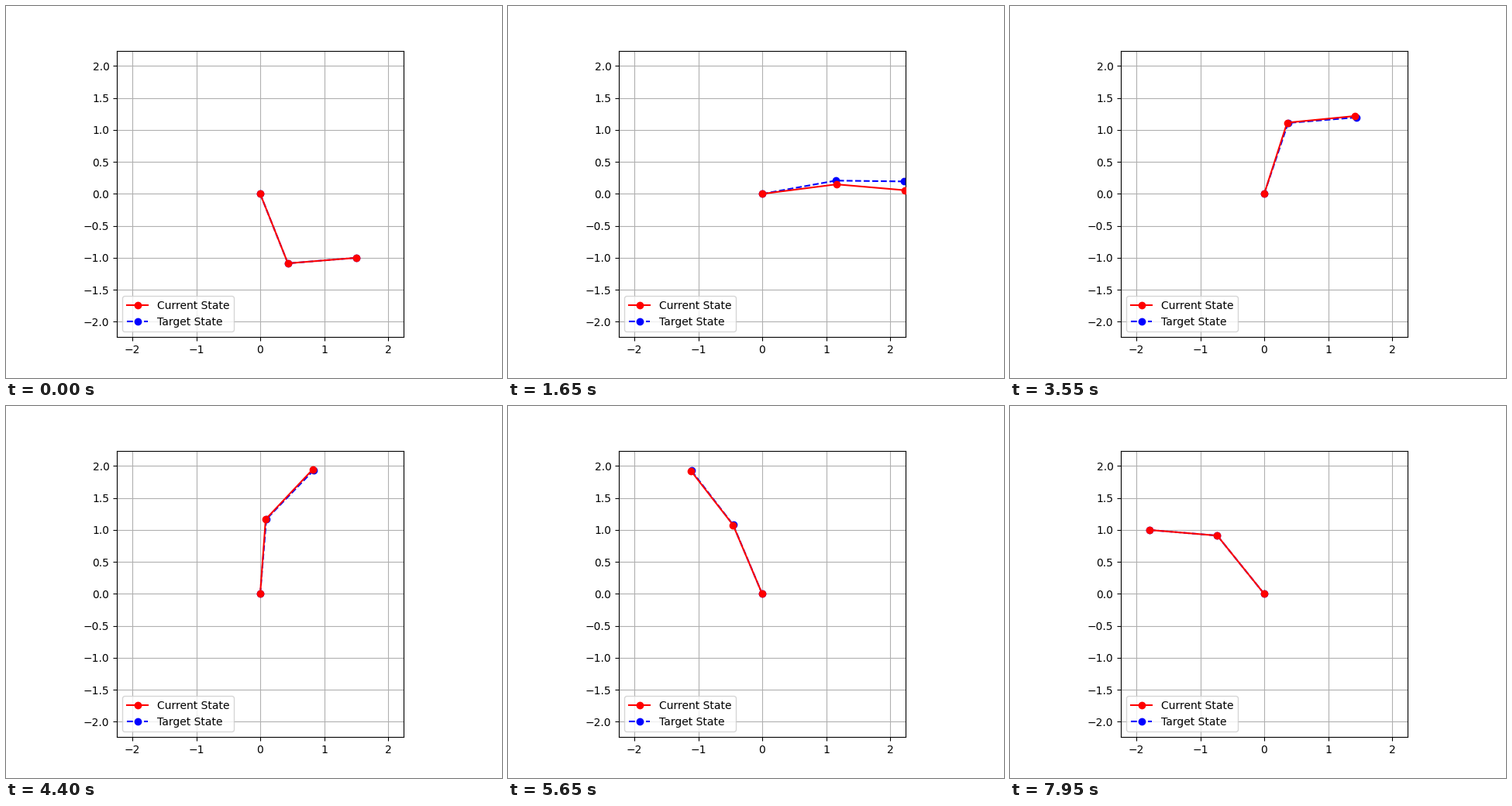
Animation, 640 px wide and 480 px high, one loop 8 s. Source, as a matplotlib script:

```python
import numpy as np
import matplotlib.pyplot as plt
from matplotlib.animation import FuncAnimation

L1, L2 = 1.17, 1.07
REACH = L1 + L2
STEP = 0.05
FRAMES = 160

# Tracking error in degrees: first joint, and absolute angle of the second link
ERR_T = np.array([0, 0.45, 0.9, 1.65, 2.35, 2.9, 3.4, 4.4, 5.65, 7, 8])
ERR_1 = np.array([0, 0.55, 1.75, 2.9, 2.3, 0.6, -0.6, -0.5, -0.15, 0, 0])
ERR_12 = np.array([0, 1.4, 3.5, 4.2, 3.0, 0.8, -0.75, -0.6, -0.3, 0, 0])


def inverse(x, y, bend):
    """Joint angles that put the tip at (x, y); bend picks the elbow side."""
    c = (x * x + y * y - L1**2 - L2**2) / (2 * L1 * L2)
    q2 = bend * np.arccos(c)
    q1 = np.arctan2(y, x) - np.arctan2(L2 * np.sin(q2), L1 + L2 * np.cos(q2))
    return np.array([q1, q2])


START = inverse(1.5, -1, 1)
MIDDLE = inverse(1.5, 1, -1)
FINISH = inverse(-1.8, 1, 1)


def ease(a, b, s):
    s = np.clip(s, 0, 1)
    return a + (b - a) * s * s * (3 - 2 * s)


def target(t):
    if t < 3:
        return ease(START, MIDDLE, t / 3)
    return ease(MIDDLE, FINISH, (t - 3) / 4)


def hermite(t, xs, ys):
    slopes = np.gradient(ys, xs)
    i = min(np.searchsorted(xs, t, side="right") - 1, len(xs) - 2)
    h = xs[i + 1] - xs[i]
    u = (t - xs[i]) / h
    return ((1 + 2 * u) * (1 - u)**2 * ys[i] + u * (1 - u)**2 * h * slopes[i]
            + u * u * (3 - 2 * u) * ys[i + 1] + u * u * (u - 1) * h * slopes[i + 1])


def joints(q1, q12):
    ex, ey = L1 * np.cos(q1), L1 * np.sin(q1)
    return [0, ex, ex + L2 * np.cos(q12)], [0, ey, ey + L2 * np.sin(q12)]


fig, ax = plt.subplots(figsize=(6.4, 4.8), dpi=100)
ax.set_xlim(-REACH, REACH)
ax.set_ylim(-REACH, REACH)
ax.set_aspect("equal")
ax.grid(True)
current_line, = ax.plot([], [], "ro-", label="Current State", zorder=3)
target_line, = ax.plot([], [], "bo--", label="Target State", zorder=2)
ax.legend(loc="lower left")


def update(frame):
    t = frame * STEP
    q1, q2 = target(t)
    q12 = q1 + q2
    target_line.set_data(*joints(q1, q12))
    lag1 = np.radians(hermite(t, ERR_T, ERR_1))
    lag12 = np.radians(hermite(t, ERR_T, ERR_12))
    current_line.set_data(*joints(q1 - lag1, q12 - lag12))
    return target_line, current_line


anim = FuncAnimation(fig, update, frames=FRAMES, interval=1000 * STEP,
                     repeat=True, repeat_delay=0)
plt.show()
```
